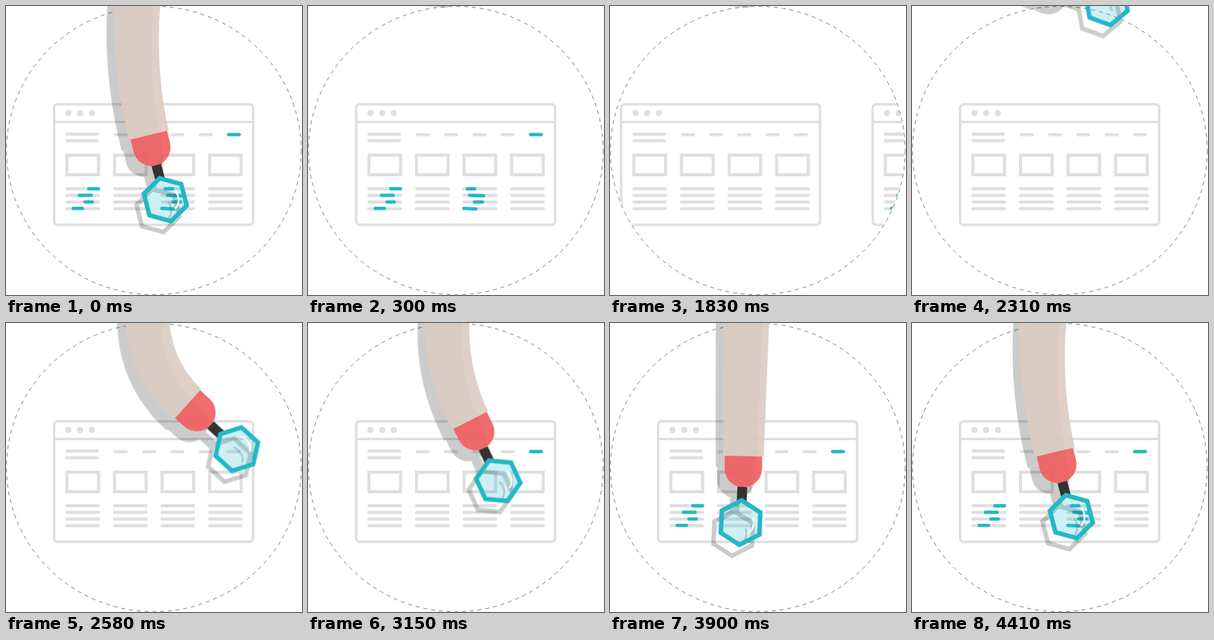
An HTML page for the animation above (4530 ms loop, 379 by 370 pixels).

```html
<!DOCTYPE html>
<html lang="en">
<head>
<meta charset="utf-8">
<title>Page inspection</title>
<style>
  html, body { margin: 0; width: 100%; height: 100%; overflow: hidden; background: #fff; }
  svg { display: block; width: 379px; height: 370px; }
  .wire { fill: none; stroke: #dfdfdf; stroke-width: 4; stroke-linecap: round; }
  .wire .frame { stroke-width: 3.2; }
  .wire circle { fill: #dfdfdf; stroke: none; }
  .mark { stroke: #22b8c8; stroke-width: 4.3; stroke-linecap: round; }
  .ring { fill: none; stroke: #858585; stroke-dasharray: 5 5; }
  .sleeve { fill: #dccdc2; opacity: .92; }
  .hand { fill: #f06060; opacity: .92; }
  .handle { fill: #333; }
  .hex { fill: #22b8c838; stroke: #22b8c8; stroke-width: 5.7; }
  .glint { fill: none; stroke: #fff; stroke-width: 2.4; stroke-linecap: round; opacity: .85; }
  .shadow { opacity: .2; }
  .shadow * { fill: #000; opacity: 1; }
  .shadow .hex, .shadow .glint { fill: none; stroke: #000; }
</style>
</head>
<body>
<svg viewBox="0 0 379 370">
  <defs>
    <clipPath id="disc"><ellipse cx="189.3" cy="185" rx="188" ry="184"/></clipPath>
    <g id="wire" class="wire"></g>
  </defs>
  <g clip-path="url(#disc)">
    <g id="old"><use href="#wire"/></g>
    <g id="fresh"><use href="#wire"/></g>
  </g>
  <ellipse class="ring" cx="189.3" cy="185" rx="188.7" ry="184.6"/>
  <g transform="translate(-9.5 14)"><g class="arm shadow"></g></g>
  <g class="arm"></g>
</svg>
<script>
const LOOP = 4530, STEP = 30, RAD = Math.PI / 180;
const $ = s => document.querySelector(s);
const clamp = v => Math.min(1, Math.max(0, v));
const span = (t, start, length) => clamp((t - start) / length);
const mix = (a, b, u) => a + (b - a) * u;
const line = (x1, y, x2) => `<path d="M${x1} ${y}H${x2}"/>`;

// Wireframe page
function wireframe() {
  let s = '<rect class="frame" x="61.6" y="125.9" width="254.8" height="154.2" rx="4.5"/>' +
    '<path class="frame" d="M62 148.5H316"/>' + line(78, 164, 117) + line(78, 172.5, 117);
  for (let i = 0; i < 3; i++) s += `<circle cx="${80 + 15 * i}" cy="137" r="3.9"/>`;
  for (let i = 0; i < 5; i++) s += line(140 + 36.2 * i, 164.7, 154 + 36.2 * i);
  for (let i = 0; i < 4; i++) {
    const x = 78 + 60.9 * i;
    s += `<rect x="${x}" y="191" width="40.5" height="25"/>`;
    for (let r = 0; r < 4; r++) s += line(x, 234 + 8.5 * r, x + 40.5);
  }
  return s;
}
$('#wire').innerHTML = wireframe();

// Highlights: x1, x2, y, slope, start, duration
const rows = (start, list) => list.map(([a, b, tilt], i) =>
  [a, b, 234 + 8.4 * i, tilt, start + 80 * i, 80]);
const marks = [
  [285, 298.8, 164.6, 0, 2610, 330],
  ...rows(3346, [[106, 118.5, 0], [94, 109, 0], [101, 110.5, 0], [86, 98, 0]]),
  ...rows(4090, [[204, 213.5, 0], [207, 225, .6], [213, 223.5, 0], [199.5, 215, .6]])
];

function addMarks(parent) {
  return marks.map(([x1, x2, y, tilt]) => {
    const el = document.createElementNS('http://www.w3.org/2000/svg', 'line');
    const set = { class: 'mark', x1, y1: y, x2, y2: y + tilt };
    for (const k in set) el.setAttribute(k, set[k]);
    return parent.appendChild(el);
  });
}
addMarks($('#old'));
const growing = addMarks($('#fresh'));

// Arm: the cuff sits at the local origin and points along +x
const LENS = 85.3, PALM = 16;
const polar = (r, deg) => `${LENS + r * Math.cos(deg * RAD)} ${r * Math.sin(deg * RAD)}`;
const hex = [0, 60, 120, 180, 240, 300].map(a => polar(28.5, a)).join(' ');
const arms = [...document.querySelectorAll('.arm')];
for (const arm of arms) arm.innerHTML = `
  <path class="sleeve"/>
  <path class="hand" d="M0-24H${PALM}A24 24 0 0 1 ${PALM} 24H0Z"/>
  <g class="tool">
    <rect class="handle" x="39.5" y="-6.3" width="18" height="12.6"/>
    <polygon class="hex" points="${hex}"/>
    <path class="glint" d="M${polar(17, -112)}A17 17 0 0 1 ${polar(17, -35)}"/>
  </g>`;

// Lens centre, cuff angle, wrist angle, sleeve bend in degrees per pixel
const away = { x: 174.7, y: -40.5, cuff: 12, wrist: -6, bend: .3 };
const nav = { x: 295.5, y: 161.5, cuff: 42, wrist: .5, bend: .365 };
const left = { x: 102.5, y: 246, cuff: 116.5, wrist: 7, bend: -.17 };
const third = { x: 204, y: 248, cuff: 76.5, wrist: -1, bend: .1 };

// start, duration, from, to, control point of the lens path
const moves = [
  [0, 300, third, away, 208, 103],
  [2220, 360, away, nav, 295, -25],
  [3090, 330, nav, left, 205, 245],
  [3750, 340, left, third, 153, 265]
];

function poseAt(t) {
  const [start, length, a, b, cx, cy] = moves.findLast(m => t >= m[0]);
  const u = Math.sin(span(t, start, length) * Math.PI / 2);
  const pose = {};
  for (const k in a) pose[k] = mix(a[k], b[k], u);
  pose.x = mix(mix(a.x, cx, u), mix(cx, b.x, u), u);
  pose.y = mix(mix(a.y, cy, u), mix(cy, b.y, u), u);
  return pose;
}

// Tapered arc running back from the cuff
function sleevePath(bend) {
  const k = (Math.abs(bend) < .001 ? .001 : bend) * RAD;
  const near = [], far = [];
  for (let s = 0; s <= 240; s += 10) {
    const a = k * s, w = 26 + s * .02;
    const x = -Math.sin(a) / k, y = (Math.cos(a) - 1) / k;
    const nx = -Math.sin(a) * w, ny = Math.cos(a) * w;
    near.push(`${x + nx} ${y + ny}`);
    far.unshift(`${x - nx} ${y - ny}`);
  }
  return 'M' + near.concat(far).join('L') + 'Z';
}

function drawArm(p) {
  const aim = (p.cuff + p.wrist) * RAD, dir = p.cuff * RAD, reach = LENS - PALM;
  const x = p.x - reach * Math.cos(aim) - PALM * Math.cos(dir);
  const y = p.y - reach * Math.sin(aim) - PALM * Math.sin(dir);
  const d = sleevePath(p.bend);
  for (const arm of arms) {
    arm.setAttribute('transform', `translate(${x} ${y}) rotate(${p.cuff})`);
    arm.querySelector('.sleeve').setAttribute('d', d);
    arm.querySelector('.tool').setAttribute('transform', `rotate(${p.wrist} ${PALM} 0)`);
  }
}

function draw(t) {
  const shift = 322 * (1 - (1 - span(t, 1594, 500)) ** 3);
  $('#old').setAttribute('transform', `translate(${shift})`);
  $('#fresh').setAttribute('transform', `translate(${shift - 322})`);
  marks.forEach(([x1, x2, y, tilt, start, length], i) => {
    const p = span(t, start, length), el = growing[i];
    el.setAttribute('x2', mix(x1, x2, p));
    el.setAttribute('y2', y + tilt * p);
    el.setAttribute('visibility', p > 0 ? 'visible' : 'hidden');
  });
  drawArm(poseAt(t));
}

let origin;
function tick(now) {
  origin ??= now;
  const t = (now - origin) % LOOP;
  draw(Math.floor(t / STEP) * STEP);
  requestAnimationFrame(tick);
}
draw(0);
requestAnimationFrame(tick);
</script>
</body>
</html>
```
